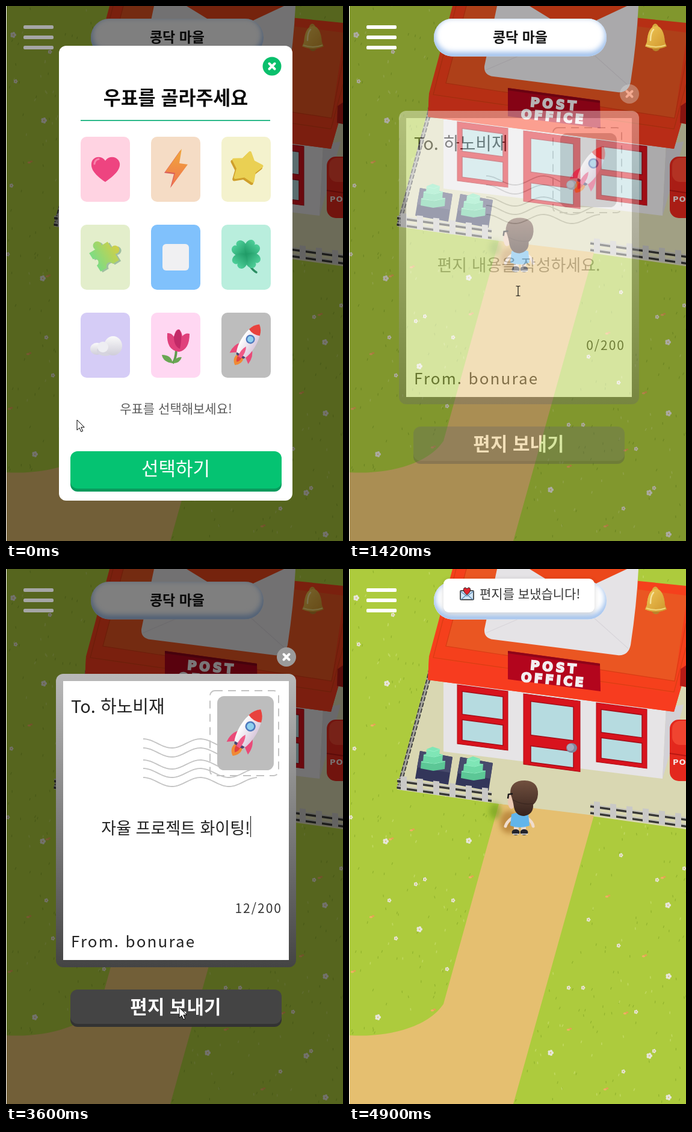
Recreate the animation shown at these times as an HTML page. Size 560x888 px, loop 4920 ms.

```html
<!DOCTYPE html>
<html lang="ko">
<head>
<meta charset="utf-8">
<style>
html,body{margin:0;width:100%;height:100%;overflow:hidden;background:#adcb3d}
svg{display:block;width:560px;height:888px}
text{font-family:'Noto Sans CJK KR','Noto Sans CJK JP','Noto Sans CJK',sans-serif;white-space:pre}
.b{font-weight:700}.m{font-weight:500}.l{font-weight:300}
.mid{text-anchor:middle}
.sign{font-family:'DejaVu Sans',sans-serif;font-weight:700}
</style>
</head>
<body>
<svg id="stage" viewBox="0 0 560 888" xmlns="http://www.w3.org/2000/svg"></svg>
<script>
const LOOP = 4920;
const stage = document.getElementById('stage');

let seed = 11;
const rnd = () => (seed = (seed * 16807) % 2147483647) / 2147483647;
const rect = (x, y, w, h, fill, rx = 0, more = '') =>
  `<rect x="${x}" y="${y}" width="${w}" height="${h}" rx="${rx}" fill="${fill}" ${more}/>`;
const poly = (pts, fill, more = '') => `<polygon points="${pts}" fill="${fill}" ${more}/>`;
const path = (d, fill, more = '') => `<path d="${d}" fill="${fill}" ${more}/>`;
const line = (d, color, w, more = '') => path(d, 'none', `stroke="${color}" stroke-width="${w}" ${more}`);
const oval = (x, y, rx, ry, fill, more = '') =>
  `<ellipse cx="${x}" cy="${y}" rx="${rx}" ry="${ry}" fill="${fill}" ${more}/>`;
const label = (x, y, size, str, cls, fill, more = '') =>
  `<text x="${x}" y="${y}" font-size="${size}" class="${cls}" fill="${fill}" ${more}>${str}</text>`;
const group = (body, more = '') => `<g ${more}>${body}</g>`;
const grad = (id, a, b, dir = 'x2="0" y2="1"') =>
  `<linearGradient id="${id}" ${dir}><stop stop-color="${a}"/><stop offset="1" stop-color="${b}"/></linearGradient>`;

const defs = `<defs>
${grad('bolt', '#efa83a', '#f2764e')}${grad('puz', '#7ddc84', '#d3cf45', 'x2="1" y2="0"')}
${grad('frame', '#b9b9b9', '#444')}${grad('bell', '#f0c957', '#cf942c', 'x2="1" y2="1"')}
${grad('cloud', '#fafafa', '#cfcdd8')}${grad('leaf', '#4fd09a', '#1f9a66')}
${grad('hair', '#71503f', '#37231d')}${grad('hull', '#ffffff', '#d9c9dc', 'x2="1" y2="0"')}
<filter id="soft" x="-50%" y="-50%" width="200%" height="200%"><feGaussianBlur stdDeviation="4"/></filter>
<filter id="glow" x="-20%" y="-20%" width="140%" height="140%"><feGaussianBlur stdDeviation="2.2"/></filter>
<clipPath id="pill"><rect x="141" y="21" width="287" height="62.5" rx="31"/></clipPath>
</defs>`;

// ---- village ----
function grass() {
  let s = rect(0, 0, 560, 888, '#adcb3d'), dark = '', light = '';
  for (let i = 0; i < 620; i++) {
    const d = `M${(rnd() * 560).toFixed(1)} ${(rnd() * 888).toFixed(1)}l${(rnd() * 3 - 1).toFixed(1)} -4`;
    if (i % 3) dark += d; else light += d;
  }
  s += line(dark, '#93b42f', 1.3) + line(light, '#c0d860', 1.6);
  const white = '63,190 16,125 9,298 61,452 67,550 73,76 12,48 111,523 173,550 117,598 78,613 163,664 48,744 3,412 ' +
    '126,515 199,451 452,475 512,516 530,558 398,582 448,625 531,676 389,695 365,695 335,803 456,834 507,800 499,808 557,497 477,735 531,877';
  const orange = '40,259 70,448 105,433 203,511 38,577 7,668 140,732 430,543 522,512 491,642 460,737 366,764 427,863';
  white.split(' ').forEach((p, i) => {
    const r = i % 3 ? 2 : 2.9;
    let f = '';
    for (let k = 0; k < 5; k++) f += oval(r * Math.cos(k * 1.257), r * Math.sin(k * 1.257), r * .75, r * .75, '#e6e6da');
    s += group(f + oval(0, 0, 1.2, 1.2, '#dcc478'), `transform="translate(${p})"`);
  });
  orange.split(' ').forEach(p => s += group(oval(-1.5, .8, 2.8, 1.7, '#f0b062') + oval(2, -1, 2.3, 1.6, '#e6a154'), `transform="translate(${p})"`));
  return s;
}

function fence(x0, x1, y0) {
  const y = x => y0 + (x - x0) * .14;
  const rail = (o, color, w) => line(`M${x0} ${y(x0) + o}L${x1} ${y(x1) + o}`, color, w);
  let s = rail(6, '#c4c3bd', 2) + rail(9, '#383838', 3.5) + rail(17, '#c4c3bd', 2) + rail(20, '#383838', 3.5);
  for (let x = x0 + 6; x < x1 - 6; x += 27)
    s += poly(`${x},${y(x)} ${x + 10},${y(x) + 1} ${x + 10},${y(x) + 24} ${x},${y(x) + 23}`, '#c9c8c6');
  return s;
}

const pane = (x, y, w, h) => rect(x, y, w, h, '#b6dbe0', 0, 'stroke="#a30d18" stroke-width="1.5"');
const opening = (x, y, w, h, panes) =>
  group(rect(0, 0, w, h, '#d8131d', 0, 'stroke="#b00d17"') + panes, `transform="translate(${x} ${y}) skewY(7.5)"`);
const windowAt = (x, y) => opening(x, y, 84, 98, pane(8, 10, 68, 38) + pane(8, 57, 68, 34));

function planter(x, y, lift) {
  let s = poly('8,0 62,10 55,56 0,46', '#33365a') + poly('8,0 62,10 58,36 3,27', '#474a6b');
  [[10, 20, 40, 16], [14, 9, 32, 15], [19, 0, 22, 13]].forEach(([a, b, w, h], i) => {
    b -= lift;
    s += poly(`${a},${b + 3} ${a + w * .45},${b - 1} ${a + w},${b + 3} ${a + w - 1},${b + h} ${a + w * .5},${b + h + 3} ${a - 1},${b + h - 1}`, ['#5cc796', '#6cd8a6', '#7fe6b6'][i]) +
      line(`M${a} ${b + 4}L${a + w * .55} ${b + 7}L${a + w} ${b + 3}`, '#98f0c8', 1);
  });
  return group(s, `transform="translate(${x} ${y})"`);
}

function house() {
  return poly('80,366 152,95 560,150 560,432 402,410 249,390 236,388', '#d9d7b2') +
    path('M249 390L407 409L273 888H0V774C62 778 130 762 157 722Z', '#e5bf70') +
    line('M82 364L131 185L154 84', '#a3a29c', 6) +
    line('M80 364L129 185L152 84M85 364L134 185L157 84', '#3a3a3a', 1.8, 'stroke-dasharray="7 3"') +
    poly('157,180 527,230 521,348 157,303', '#e6e4e6') +
    poly('527,230 556,225 535,300 521,348', '#d3d1d6') +
    poly('172,0 244,0 482,20 560,28 560,168 540,237 131,184 133,145', '#f5401c') +
    poly('195,0 480,0 480,34 560,44 560,60 541,186 161,128', '#ea5622') +
    line('M178 0L140 147L540 204L560 130M195 0L161 128L541 186L560 90', '#d83c14', 1.2) +
    poly('133,148 540,206 560,150 560,168 540,237 131,184', '#f73c1f') +
    path('M246 0L225 100Q224 115 240 117L446 143Q464 145 468 126Q478 60 481 0Z', '#e5e3e6') +
    poly('300,0 370,43 462,0', '#ec471a') +
    line('M228 106L330 62M464 132L390 66', '#d8d5da', 1.2) +
    poly('264,136 417,157 418,203 264,183', '#b3051d') + poly('264,136 417,157 417,161 264,140', '#8f0418') +
    group(label(2, 0, 21, 'POST', 'sign mid', '#f3eef0', 'letter-spacing="4.5"') +
      label(2, 21, 21, 'OFFICE', 'sign mid', '#f3eef0', 'letter-spacing="4"'),
      'transform="translate(339 170) rotate(5)" stroke="#f3eef0" stroke-width="2"') +
    windowAt(180, 192) + windowAt(411, 222) +
    opening(290, 207, 94, 117, pane(12, 11, 71, 56) + pane(12, 85, 71, 27)) +
    oval(370, 297, 9, 8, '#7f8499') + oval(368, 296, 6, 6, '#a5a9bb') +
    poly('551,166 560,160 560,196 550,194', '#b51b16') +
    rect(533, 250, 60, 102, '#e3281d', 15) + rect(537, 252, 56, 40, '#f04430', 13) + line('M533 306L560 310', '#b81712', 2) +
    label(538, 325, 13, 'PO', 'sign', '#f4e6e4', 'letter-spacing="1"') +
    planter(110, 302, 6) + planter(177, 312, 0) +
    fence(80, 237, 343) + fence(401, 566, 385);
}

function person() {
  return oval(243, 402, 10, 13, '#6f9a1c', 'filter="url(#soft)" opacity=".6"') +
    oval(266, 420, 15, 19, '#b07a30', 'filter="url(#soft)" opacity=".75"') +
    line('M270 414Q262 420 260 427M297 414Q305 420 306 427', '#f0dccd', 5, 'stroke-linecap="round"') +
    rect(274, 425, 8, 12, '#e9d8cc', 2) + rect(286, 425, 8, 12, '#e9d8cc', 2) +
    oval(277, 437, 6.5, 5, '#24242c') + oval(291, 437, 6.5, 5, '#24242c') +
    line('M272 440H282M286 440H297', '#eee', 1.5) +
    path('M270 407Q284 401 298 407L300 426Q284 432 268 426Z', '#62b5ea') +
    group(oval(270, 386, 6, 12, '#ecc9b2') +
      path('M268 372Q268 351 292 351Q315 352 314 374Q313 386 306 391Q307 407 291 410Q277 410 274 395Q273 386 268 372Z', 'url(#hair)') +
      line('M272 373L265 374L264 381', '#1d1a1c', 2.5) +
      line('M272 383Q290 393 307 389', '#2f1f1a', 1.2, 'opacity=".6"'), 'id="hairdo"');
}

// ---- header ----
const burger = group([32, 49, 66].map(y => rect(29, y, 50, 6, '#fff', 2.5)).join(''), 'id="burger"');
const header = group(
  rect(141, 21, 287, 62.5, '#fff', 31) +
  group(rect(137, 13, 295, 70, 'none', 35, 'stroke="#9fc0ec" stroke-width="13" filter="url(#soft)"'), 'clip-path="url(#pill)"') +
  label(284.5, 60, 23, '콩닥 마을', 'b mid', '#111') + burger +
  oval(510, 70, 6, 5, '#b9822a') + line('M505 35Q509 27 513 35', '#d9a83e', 3) +
  path('M495 60Q497 34 510 33Q523 34 525 60L528 67Q511 75 492 67Z', 'url(#bell)') +
  line('M494 65Q510 71 526 65', '#f0d87c', 2) + line('M501 57Q501 44 506 39', '#f6e29a', 2.5, 'stroke-linecap="round"'), 'id="head"');

// ---- stamps, each in an 82 x 108 tile ----
const star = r => Array.from({ length: 10 }, (_, i) => {
  const a = i * Math.PI / 5 - 1.35, q = i % 2 ? r * .58 : r;
  return `${(q * Math.cos(a)).toFixed(1)},${(q * Math.sin(a)).toFixed(1)}`;
}).join(' ');
const leafShape = 'M0 0C-16 -6 -16 -24 -6 -25Q-1 -25 0 -21Q1 -25 6 -25C16 -24 16 -6 0 0Z';
const jigsaw = 'M-18 -18H-6A7 7 0 1 1 6 -18H18V-6A7 7 0 1 1 18 6V18H6A6 6 0 1 0 -6 18H-18V6A6 6 0 1 0 -18 -6Z';
const icons = [
  path('M41 75C22 62 17 53 18 44C20 31 36 31 41 40C46 31 62 31 65 44C66 53 60 62 41 75Z', '#ee4480') + line('M23 45Q24 38 30 37', '#f884ab', 3, 'stroke-linecap="round"'),
  poly('49,22 22,60 38,62 32,85 59,48 45,46', '#d9605c') + poly('51,20 24,58 40,60 34,82 61,46 47,44', 'url(#bolt)'),
  group(poly(star(25), '#cf9f2b', 'stroke="#cf9f2b" stroke-width="6" stroke-linejoin="round" transform="translate(-2 3)"') +
    poly(star(25), '#ead053', 'stroke="#ead053" stroke-width="5" stroke-linejoin="round"'), 'transform="translate(42 51)"'),
  group(path(jigsaw, '#9fbfa0', 'transform="translate(2 3)"') + path(jigsaw, 'url(#puz)'), 'transform="translate(39 53) rotate(-32)"'),
  rect(19, 32, 44, 44, '#f0f0f2', 6),
  line('M41 52Q46 72 58 79', '#2a8d62', 3.5, 'stroke-linecap="round"') +
    [-48, 42, 132, 222].map(a => path(leafShape, 'url(#leaf)', `transform="translate(41 49) rotate(${a})"`)).join(''),
  oval(27, 60, 11, 10, 'url(#cloud)') + oval(41, 63, 14, 9, '#d6d4df') + oval(54, 55, 15, 16, 'url(#cloud)') + oval(37, 57, 9, 9, '#eeeef2'),
  line('M42 62Q41 78 36 84', '#5f9c4d', 4) + path('M36 84Q20 82 18 70Q34 70 36 84Q42 72 51 74Q48 84 36 84Z', '#6aa653') +
    path('M27 34Q34 33 38 40Q41 26 47 28Q51 32 52 39Q57 33 64 35Q64 62 46 65Q25 62 27 34Z', '#e0417c') +
    path('M38 40Q42 28 47 28Q53 36 48 60Q38 56 38 40Z', '#c22a68'),
  group(path('M-6 24Q-10 35 0 42Q10 34 6 24Z', '#f08a35') + path('M-3 24Q-5 31 0 36Q5 31 3 24Z', '#e2413f') +
    path('M-10 4Q-20 14 -18 29L-7 21ZM10 4Q20 14 18 29L7 21Z', '#ea4a78') + rect(-8, 20, 16, 6, '#4a4570', 3) +
    path('M0 -37C16 -24 15 8 9 22H-9C-15 8 -16 -24 0 -37Z', 'url(#hull)') +
    path('M0 -37Q8 -31 10.5 -21Q0 -16 -10.5 -21Q-8 -31 0 -37Z', '#e8423d') +
    oval(0, -8, 7.5, 7.5, '#4e79bd') + oval(0, -8, 5.2, 5.2, '#8fd0ef') + path('M0 6Q5 14 3 27H-3Q-5 14 0 6Z', '#ef5a86'),
    'transform="translate(44 51) rotate(31)"')
];
const tints = ['#ffd3e2', '#f5dcc5', '#f4f2cd', '#e3eecb', '#80c1fc', '#b9eedd', '#d5ccf6', '#ffd7f2', '#bdbdbd'];
const tile = i => rect(0, 0, 82, 108, tints[i], 10) + icons[i];

const shade = rect(0, 0, 560, 888, '#000', 0, 'opacity=".5"');
const cross = (x, y, r, fill) => oval(x, y, r, r, fill) +
  line(`M${x - 4.5} ${y - 4.5}l9 9m0 -9l-9 9`, '#fff', 4, 'stroke-linecap="round"');
const button = (y, h, fill, edge, str, cls) =>
  rect(107, y + 5, 351, h, edge, 12) + rect(107, y, 351, h, fill, 12) + label(282, y + 39.5, 31, str, cls + ' mid', '#fff');

const picker = group(shade +
  rect(88, 66, 388, 755, '#fff', 12) + cross(442, 100, 15.5, '#0abf6c') +
  label(282, 164, 31.5, '우표를 골라주세요', 'b mid', '#0a0a0a') + rect(124, 189, 315, 2, '#2db98a') +
  rect(357, 507, 84, 112, 'none', 11, 'stroke="#ff4f48" stroke-width="6" filter="url(#glow)" id="glowing"') +
  tints.map((_, i) => group(tile(i), `transform="translate(${124 + i % 3 * 117} ${217 + (i / 3 | 0) * 146})"`)).join('') +
  rect(358, 508, 82, 110, 'none', 10, 'stroke="#ff7a72" stroke-width="2" id="ring"') +
  label(282.5, 676, 21, '', 'mid', '#5c5c5c', 'id="hint"') +
  button(739, 62, '#05c372', '#079a5c', '선택하기', 'm'), 'id="picker"');

// ---- letter ----
function waves() {
  let d = '';
  for (const y of [282, 297, 317, 331, 346])
    for (let x = 228; x <= 417; x += 3)
      d += (x > 228 ? 'L' : 'M') + x + ' ' + (y + 7.5 - 7.5 * Math.cos((x - 228) / 95 * 2 * Math.PI)).toFixed(1);
  return line(d, '#c3c3c3', 1.8);
}
const letter = group(shade +
  rect(83, 174, 399, 487, 'url(#frame)', 12) + rect(95, 186, 375, 463, '#fff') + cross(466, 146, 16, '#9b9b9b') +
  waves() + rect(339, 202, 114, 141, 'none', 8, 'stroke="#c3c3c3" stroke-width="2" stroke-dasharray="13 9"') +
  group(tile(8), 'transform="translate(351 211) scale(1.146 1.139)"') +
  label(108, 239, 29, 'To. 하노비재', 'l', '#222') +
  label(108, 628, 26, 'From. bonurae', 'l', '#222', 'letter-spacing="2.1"') +
  label(282, 440, 27, '', 'l mid', '#222', 'id="note"') +
  line('', '#222', 1.2, 'id="caret"') +
  label(459, 571, 21, '', 'l', '#333', 'id="count" text-anchor="end" letter-spacing="2"') +
  button(698, 57, '#444', '#333', '편지 보내기', 'b'), 'id="letter"');

const toast = group(
  rect(157, 18, 251, 56, '#000', 9, 'opacity=".16" filter="url(#soft)"') + rect(157, 16, 251, 56, '#fff', 9) +
  rect(185, 36, 22, 15, '#cfe5f7', 1, 'stroke="#222" stroke-width="1.5"') + line('M185 37L196 45L207 37M186 51L194 44M206 51L198 44', '#5b88b5', 1.2) +
  path('M196 43C189 38 189 31 193 31Q195 31 196 33Q197 31 199 31C203 31 203 38 196 43Z', '#e0242f', 'stroke="#222" stroke-width="1"') +
  label(217, 49, 21, '편지를 보냈습니다!', 'm', '#363636'), 'id="toast"');

stage.innerHTML = defs + grass() + house() + person() + header + picker + letter +
  '<use href="#head" id="headTop"/><use href="#burger" id="burgerTop" opacity=".3"/>' + toast +
  path('M0 0V17L4 13.2L6.8 19.6L9.6 18.4L6.8 12.2H12.2Z', '#fff', 'stroke="#000" stroke-width="1" id="arrow"') +
  line('M-3.5 -8H-1Q0 -8 0 -7Q0 -8 1 -8H3.5M0 -7V7M-3.5 8H-1Q0 8 0 7Q0 8 1 8H3.5', '#000', 1.1, 'id="beam"') +
  rect(0, 0, 1, 888, '#fff');

const el = {};
stage.querySelectorAll('[id]').forEach(e => el[e.id] = e);
const set = (id, k, v) => el[id].setAttribute(k, v);
const show = (id, on) => { el[id].style.display = on ? '' : 'none'; };
const clamp = v => Math.max(0, Math.min(1, v));
const span = (t, a, b) => clamp((t - a) / (b - a));
const ease = p => p * p * (3 - 2 * p);

// every state of the text while the syllables are composed
const typed = [['', 'ㅈ 자 장 자유 자율'], ['자율 ', 'ㅍ 프 플 프로 프롲 프로제 프로젝 프로젝ㅌ 프로젝트'],
  ['자율 프로젝트 ', 'ㅎ 호 화 황 화이 화잍 화이티 화이팅 화이팅!']]
  .flatMap(([head, keys]) => [head, ...keys.split(' ').map(k => head + k)]);
const textAt = t => {
  if (t < 1920) return '';
  const n = t < 2740 ? Math.min(16, 1 + Math.floor((t - 1920) / 50)) : 17 + Math.floor((t - 2740) / 32);
  return typed[Math.min(n, typed.length - 1)];
};

const route = [[0, 118, 687], [500, 398, 572], [570, 398, 572], [760, 324, 755], [970, 324, 755], [1330, 285, 480],
  [1420, 281, 473], [1520, 281, 473], [1740, 266, 435], [3100, 266, 435], [3560, 288, 728], [3680, 288, 728], [3960, 536, 425], [4130, 575, 395]];
function pointer(t) {
  const i = route.findIndex(k => k[0] > t);
  if (i < 0) return route[route.length - 1].slice(1);
  const [a, b] = [route[i - 1], route[i]], p = ease(span(t, a[0], b[0]));
  return [a[1] + (b[1] - a[1]) * p, a[2] + (b[2] - a[2]) * p];
}

function draw(t) {
  const pick = 1 - span(t, 970, 1170);
  const note = span(t, 1310, 1530) * (1 - span(t, 3650, 3850));
  const open = Math.max(pick, note);
  // the header stays above a modal while it fades
  show('headTop', open < 1);
  show('burgerTop', open === 1);
  set('picker', 'opacity', pick); show('picker', pick > 0);
  set('letter', 'opacity', note); show('letter', note > 0);

  const chosen = t >= 520;
  show('glowing', chosen); show('ring', chosen);
  el.hint.textContent = chosen ? '응원의 마음을 전달해보세요!' : '우표를 선택해보세요!';

  const str = textAt(t);
  el.note.textContent = str || '편지 내용을 작성하세요.';
  set('note', 'fill', str ? '#222' : '#8f8f8f');
  el.count.textContent = str.length + '/200';
  const w = str && note > 0 ? el.note.getComputedTextLength() : 0;
  const cx = Math.round(282 + w / 2) + .5;
  const composing = str && !/[ !]$/.test(str);
  set('caret', 'd', t < 1740 ? '' : `M${cx} 410V445` + (composing ? `M${cx - 25} 445.5H${cx}` : ''));

  const sway = Math.sin((t - 3960) / 940 * 2 * Math.PI);
  set('hairdo', 'transform', `translate(${(t < 3700 ? -8 : 0) + sway * .6} ${sway * .5})`);

  const p = span(t, 3680, 3960), q = 1 - Math.pow(1 - p, 3), s = .6 + .4 * q;
  show('toast', p > 0);
  set('toast', 'opacity', .5 + .5 * q);
  set('toast', 'transform', `translate(282.5 ${44 - 112 * (1 - q)}) scale(${s}) translate(-282.5 -44)`);

  const [x, y] = pointer(t), beam = t > 1330 && t < 3340;
  show('beam', beam); show('arrow', !beam && t < 4130);
  set(beam ? 'beam' : 'arrow', 'transform', `translate(${x.toFixed(1)} ${y.toFixed(1)})`);
}

function tick() {
  draw(performance.now() % LOOP);
  requestAnimationFrame(tick);
}
tick();
</script>
</body>
</html>
```
